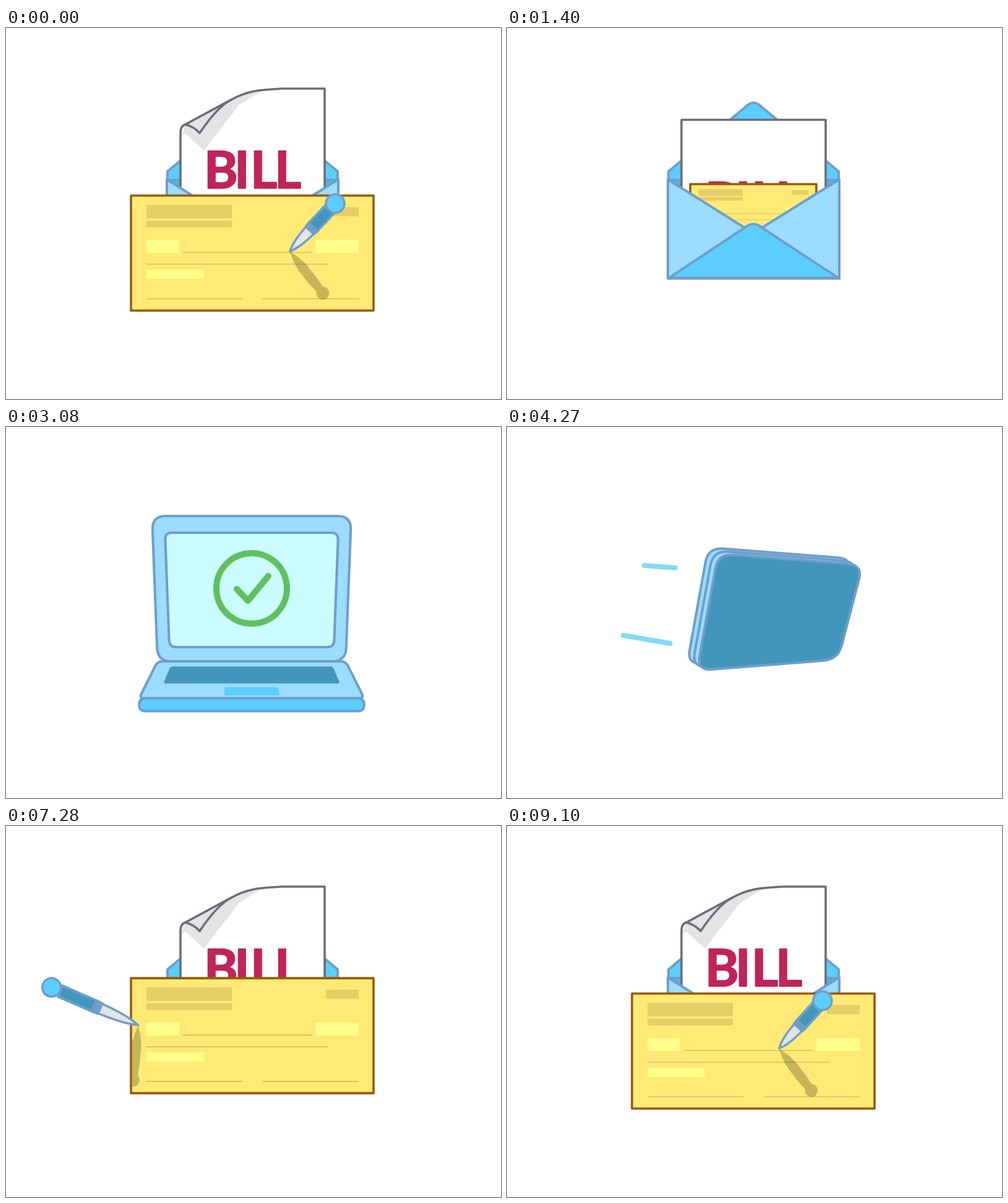
These frames come from a looping animation (800 by 600 pixels, 9170 ms). An HTML page:

```html
<!DOCTYPE html>
<html lang="en">
<head>
<meta charset="utf-8">
<title>Bill payment</title>
<style>
  html, body { margin: 0; width: 100%; height: 100%; overflow: hidden; background: #fff; }
  svg { display: block; width: 100%; height: 100%; }
</style>
</head>
<body>
<svg id="stage" viewBox="0 0 800 600" fill="none" stroke-linejoin="round" stroke-linecap="round"></svg>
<script>
const stage = document.getElementById('stage');
const LOOP = 9170, STEP = 70, CX = 398.5;
const SKY = '#5bceff', PALE = '#9bdcff', EDGE = '#6e9ecb', TEAL = '#4396bb',
  GLASS = '#cbfdff', DASH = '#83d9f3', GREEN = '#60c060', INK = '#6a6e78', FOLD = '#e4e4e4';

/* Timing */
const mix = (a, b, f) => a + (b - a) * f;
const ramp = (t, a, b) => Math.max(0, Math.min(1, (t - a) / (b - a)));
const smooth = (t, a, b) => { const f = ramp(t, a, b); return f * f * (3 - 2 * f); };
const speedUp = (t, a, b) => ramp(t, a, b) ** 2;
const slowDown = (t, a, b) => 1 - (1 - ramp(t, a, b)) ** 2;
const overshoot = (t, a, b, s) => {
  const u = ramp(t, a, b) - 1;
  return 1 + (s + 1) * u ** 3 + s * u * u;
};

/* Drawing */
const tag = (name, attrs, inner = '') => {
  const list = Object.entries(attrs).map(([k, v]) => `${k}="${v}"`).join(' ');
  return `<${name} ${list}>${inner}</${name}>`;
};
const group = (transform, inner) => tag('g', { transform }, inner);
const path = (d, fill = 'none', stroke = 'none', width = 4, extra = {}) =>
  tag('path', { d, fill, stroke, 'stroke-width': width, ...extra });
const box = (x, y, width, height, fill) => tag('rect', { x, y, width, height, fill });
const clipped = (id, area, inner, opacity = 1) =>
  tag('clipPath', { id }, area) + tag('g', { 'clip-path': `url(#${id})`, opacity }, inner);

// Closed polygon with rounded corners.
function rounded(pts, r) {
  const toward = (a, b) => {
    const f = Math.min(0.5, r / (Math.hypot(b[0] - a[0], b[1] - a[1]) || 1));
    return [mix(a[0], b[0], f), mix(a[1], b[1], f)];
  };
  return pts.map((p, i) => {
    const before = toward(p, pts[(i + pts.length - 1) % pts.length]);
    const after = toward(p, pts[(i + 1) % pts.length]);
    return `${i ? 'L' : 'M'}${before} Q${p} ${after}`;
  }).join(' ') + 'Z';
}

// Four corners from a centre and half width at the top and at the bottom.
const trapezoid = (x, w, y, x2, w2, y2) => [[x - w, y], [x + w, y], [x2 + w2, y2], [x2 - w2, y2]];

/* Envelope: k is 1 with the flap up and negative with it down */
function flap(k) {
  const y = h => 246 - h * k;
  return path(`M261 246 L261 ${y(14)} L385 ${y(118)} Q${CX} ${y(132)} 412 ${y(118)} L536 ${y(14)} L536 246Z`,
    SKY, EDGE);
}
const pocket = () =>
  path('M260 246 L398 332 L260 405Z M537 246 L398 332 L537 405Z', PALE) +
  path('M262 404 L384 323 Q398.5 311 412 323 L535 404Z', SKY, EDGE) +
  path('M260 405 L260 245 L384 323 M412 323 L537 245 L537 405 L260 405', 'none', EDGE);

function envelope(t, note) {
  const k = 1 + 1.94 * (slowDown(t, 5670, 6090) - smooth(t, 1600, 2040));
  const wide = Math.max(0.05, 1 - smooth(t, 2030, 2170) + overshoot(t, 4410, 5040, 1.2));
  const top = 98 + 237 * (speedUp(t, 1220, 1610) - overshoot(t, 5904, 6504, 1.4));
  const curl = 1 - smooth(t, 1050, 1330) + smooth(t, 6160, 6650);
  const papers = (top < 330 ? bill(top, curl) : '') + note;
  return group(`translate(${CX} 325) scale(${wide} 1) translate(${-CX} -325)`,
    (k > 0 ? flap(k) : '') + path('M260 246 H537 V405 H260Z', '#57b0dc', EDGE) +
    clipped('slot', box(200, 0, 400, 400), papers) + pocket() + (k <= 0 ? flap(k) : ''));
}

/* Bill: c is how far the corner is curled */
function bill(top, c) {
  const at = (x, y) => `${mix(282, x, c)} ${mix(0, y, c)}`;
  const edge = `M282 260 L282 ${72 * c} Q${at(282, 60)} ${at(290, 58)} L${at(364, 18)} C${at(390, 3)} ${at(410, 2)} ${at(447, 0)} L515 0`;
  const fold = `M${at(290, 58)} Q${at(303, 61)} ${at(313, 72)} Q${at(341, 30)} ${at(364, 18)}Z`;
  const shade = `M${at(283, 77)} L${at(290, 73)} L${at(320, 100)} L${at(377, 26)} L${at(415, 3)} Q${at(385, 6)} ${at(364, 18)} L${at(290, 58)}Z`;
  const word = tag('text', {
    x: '320 369 395 434', y: 161, fill: '#c0245a', stroke: '#c0245a', 'stroke-width': 2,
    'font-size': 83, 'font-weight': 700, 'font-family': 'Lato, sans-serif'
  }, 'BILL');
  return group(`translate(0 ${top})`,
    path(edge + ' L515 260Z', '#fff') + (c > 0 ? path(shade, FOLD) : '') + word +
    path(edge + ' L515 260', 'none', INK, 3.6) + (c > 0 ? path(fold, FOLD, INK, 3.6) : ''));
}

/* Cheque, scaled around its top centre */
function cheque(top, scale) {
  const bar = (x, y, w, h) => box(x, y, w, h, '#e7cd66');
  const lit = (x, y, w, h) => box(x, y, w, h, '#ffff8c');
  const rule = (x, y, end) => path(`M${x} ${y}H${end}`, 'none', '#c6ac5c', 1.2);
  return group(`translate(398 ${top}) scale(${scale}) translate(-398 0)`,
    path('M202 0H594V186H202Z', '#ffea75', '#97590f', 3.6, { 'vector-effect': 'non-scaling-stroke' }) +
    bar(227, 15, 138, 22) + bar(227, 40.5, 138, 11) + bar(517, 18.5, 53, 15) +
    lit(227, 72, 53, 21) + lit(500, 72, 70, 21) + lit(227, 120, 92.5, 15) +
    rule(286, 92, 494) + rule(227, 111, 520) + rule(227, 167, 382) + rule(415, 167, 570));
}

function chequePose(t) {
  if (t > 6650) return [mix(625, 271, overshoot(t, 6650, 7700, 1.4)), 1];
  const f = ramp(t, 70, 980), lift = smooth(t, 70, 980);
  const scale = mix(1, 0.52, lift) + 0.38 * Math.sin(Math.PI * f) * (1 - f);
  return [mix(364, 129, lift) - 93 * scale + 265 * smooth(t, 1050, 1633), scale];
}

/* Pen: tip position, vector from tip to head, size */
function penPose(t) {
  if (t < 1000) {
    const f = speedUp(t, 0, 560);
    return [459 + 250 * f, 361 - 230 * f, 73, -77, 1 - smooth(t, 420, 560)];
  }
  const enter = slowDown(t, 6930, 7563), turn = smooth(t, 7280, 8400), w = ramp(t, 8540, LOOP);
  const wave = 26 * (1 - w) * Math.sin(3 * Math.PI * w) ** 2;
  return [mix(-80, 287, enter) + 172 * w, mix(138, 368, enter) - 7 * w - wave,
    mix(-140, 70, turn), mix(-61, -77, turn), 1];
}

const aim = (x, y, dx, dy, s = 1) =>
  `translate(${x} ${y}) rotate(${Math.atan2(dy, dx) * 180 / Math.PI}) scale(${s})`;

function shadow([x, y, vx], top) {
  const dx = 32 + 0.286 * vx, dy = 74 - 0.1 * vx, n = Math.hypot(dx, dy);
  const shape = path(`M0 0 Q${n * 0.2} -7 ${n * 0.4} -8 H${n * 0.7} L${n} -6 V6 L${n * 0.7} 8 H${n * 0.4} Q${n * 0.2} 7 0 0Z`, '#000') +
    tag('circle', { cx: n, cy: 0, r: 10.5, fill: '#000' });
  return clipped('paper', box(204, top + 2, 388, 182), group(aim(x, y + 1, dx, dy), shape), 0.22);
}

function pen([x, y, dx, dy, s]) {
  const n = Math.hypot(dx, dy);
  const tube = (a, b, w, fill) => path(`M${n * a} ${-w} H${n * b} V${w} H${n * a}Z`, fill, EDGE);
  return group(aim(x, y, dx, dy, s),
    path(`M0 0 Q${n * 0.15} -8 ${n * 0.47} -8.5 V8.5 Q${n * 0.15} 8 0 0Z`, '#e4e4e6', EDGE, 3.5) +
    tube(0.48, 0.9, 9.5, TEAL) + tube(0.44, 0.51, 9, EDGE) +
    tag('circle', { cx: n, cy: 0, r: 15, fill: SKY, stroke: EDGE, 'stroke-width': 3.5 }));
}

/* Laptop */
function badge(t, x, y) {
  const draw = (d, f) => f <= 0 ? '' : path(d, 'none', GREEN, 10,
    f < 1 ? { pathLength: 1, 'stroke-dasharray': `${f} 2` } : {});
  return group(`translate(${x} ${y})`,
    draw('M-45 -35 A56 56 0 0 1 45 35 A56 56 0 0 1 -45 -35', ramp(t, 2475, 2800)) +
    draw('M-24 1 L-6 20 L27 -20', ramp(t, 2800, 2940)));
}

function laptop(t) {
  const open = overshoot(t, 2340, 3046, 1) - smooth(t, 3990, 4130);
  const wobble = Math.sin(Math.PI * ramp(t, 2340, 3046));
  const a = open * 108.5 * Math.PI / 180, p = 1 + 0.19 * Math.sin(a);
  const cx = 397, hinge = 379, half = 154 * p, front = cx - 15 * wobble, lidX = cx - 5 * wobble;
  const low = hinge - 215 * p * Math.cos(a), high = low - 22 * Math.sin(a);
  const top = 164 - 20 * open * open;
  const tilt = pts => { pts[0][1] += 3 * wobble; pts[1][1] -= 3 * wobble; return pts; };
  const face = (pts, r, fill, stroke = EDGE) => path(rounded(pts, r), fill, stroke);
  let out = face(tilt(trapezoid(lidX, 161, top, cx, 152, hinge)), 22, PALE) +
    face(tilt(trapezoid(lidX, 140, top + 27, cx, 133, 356)), 11, GLASS) + badge(t, lidX, top + 117);
  if (high > hinge) {
    const panel = (f, g, w) => trapezoid(mix(cx, front, f), w * mix(152, half, f), mix(hinge, high, f),
      mix(cx, front, g), w * mix(152, half, g), mix(hinge, high, g));
    out += face(panel(0, 1, 1), 8, PALE) + face(panel(0.14, 0.6, 0.84), 4, TEAL, 'none') +
      face(panel(0.7, 0.92, 0.25), 3, SKY, 'none');
  }
  if (low < hinge) out += face(trapezoid(front, half, low, cx, 152, hinge), 18, TEAL);
  return out + face(trapezoid(front, half, high, front, half, low), 10, SKY);
}

// Folded laptop that turns away into a thin edge.
function folded(t) {
  const turn = smooth(t, 4130, 4270);
  const wide = Math.max(0.05, smooth(t, 2170, 2340) - smooth(t, 4270, 4410));
  const flat = trapezoid(397, 154, 164, 397, 152, 379);
  const turned = [[341, 205], [575, 223], [535, 376], [307, 394]];
  const layer = (f, fill) => path(rounded(flat.map(([x, y], i) =>
    [mix(x, turned[i][0] - 16 * f, turn), mix(y, turned[i][1] - 10 * f, turn)]), 24), fill, EDGE);
  return group(`translate(${CX} 0) scale(${wide} 1) translate(${-CX} 0)`,
    layer(1, PALE) + layer(0.5, PALE) + layer(0, TEAL));
}

// Speed lines that grow from one end and vanish at the other.
function dashes(t, begin, lines) {
  const e = ramp(t, begin, begin + 200), s = ramp(t, begin + 160, begin + 370);
  if (s >= e) return '';
  return lines.map(([x, y, x2, y2]) => path(
    `M${mix(x, x2, s)} ${mix(y, y2, s)} L${mix(x, x2, e)} ${mix(y, y2, e)}`, 'none', DASH, 8)).join('');
}

function render(t) {
  const [top, scale] = chequePose(t), hand = penPose(t);
  const note = t < 1633 || t > 6650 ? cheque(top, scale) : '';
  const inside = t >= 980 && t < 1633;
  const computer = t >= 2170 && t < 4410;
  const unfolded = t >= 2340 && t < 4130;

  let out = dashes(t, 2170, [[178, 262, 178, 216], [236, 308, 178, 322], [584, 273, 560, 285]]) +
    dashes(t, 4060, [[287, 229, 222, 224], [287, 354, 188, 337]]);
  if (computer) out += unfolded ? laptop(t) : folded(t);
  else out += envelope(t, inside ? note : '');
  if (!inside) out += note;
  if (t < 140 || t > 7000) out += shadow(hand, top);
  if (t < 560 || t > 6930) out += pen(hand);
  stage.innerHTML = out;
}

const start = performance.now();
let shown = -1;
function tick() {
  const t = Math.floor(((performance.now() - start) % LOOP) / STEP) * STEP;
  if (t !== shown) render(shown = t);
  requestAnimationFrame(tick);
}
tick();
</script>
</body>
</html>
```
